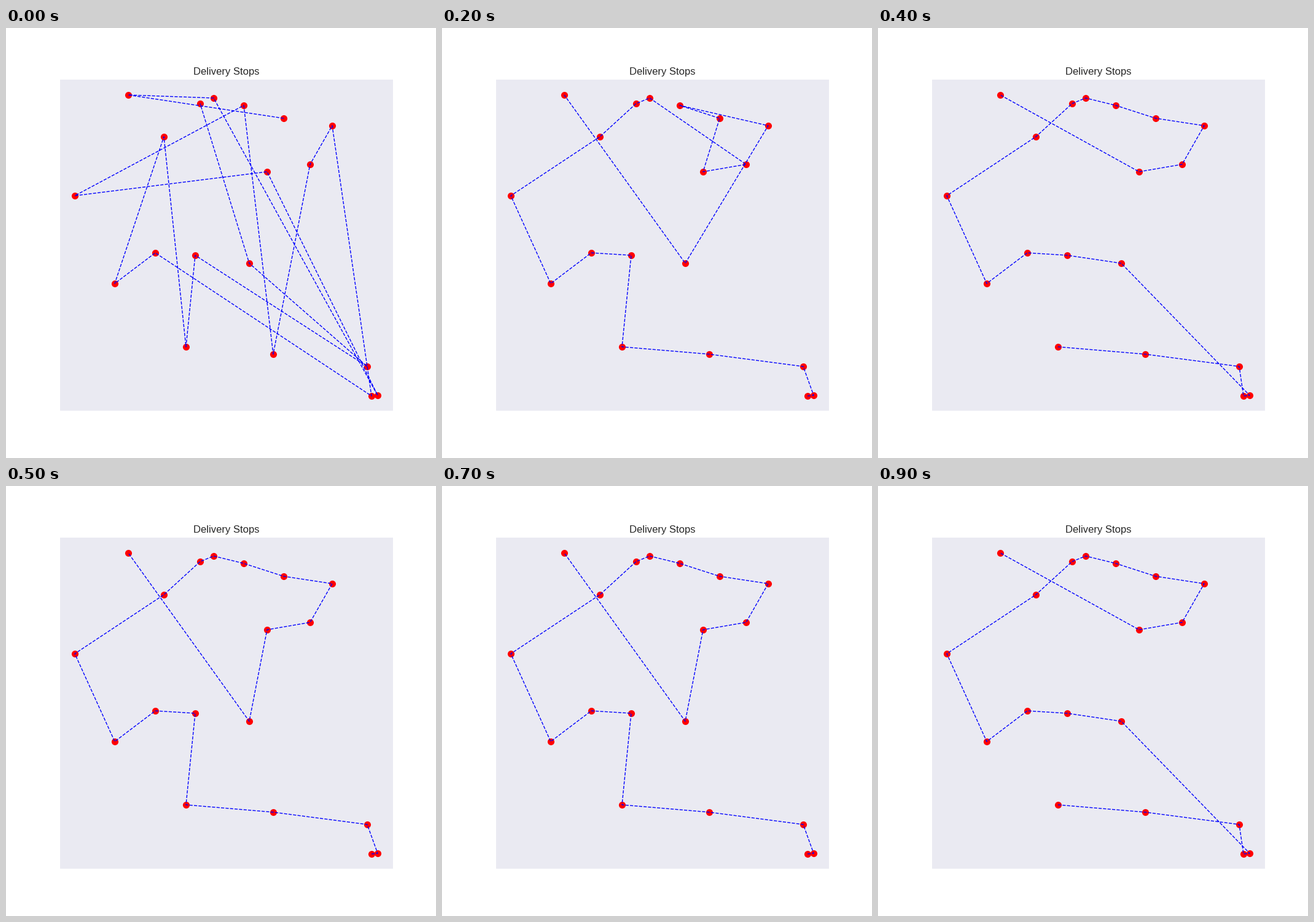
A matplotlib script for the animation above (1000 ms loop, 700 by 700 pixels).

```python
import math

import matplotlib.pyplot as plt
from matplotlib.animation import FuncAnimation

SIZE, DPI = 700, 100
FRAMES, INTERVAL = 10, 100

# Stop positions in stage pixels, y pointing down.
STOPS = {
    "A": (199, 109), "B": (338, 114), "C": (316, 123), "D": (387, 126),
    "E": (452, 147), "F": (531, 159), "G": (257, 177), "H": (495, 222),
    "I": (425, 234), "J": (112, 273), "K": (243, 366), "L": (308, 370),
    "M": (396, 383), "N": (177, 416), "O": (293, 519), "P": (435, 531),
    "Q": (588, 551), "R": (595, 599), "S": (605, 598),
}
Y_SCALE = 1.02  # map distance per pixel, vertical relative to horizontal

# The search explores first, then settles on nearest-neighbour tours.
EXPLORED = ["EABSIJDPHFRKNGOLQMC", "KLMPOHIDBCGAJNEFRQS", "RSQPOLKNJGCBHIEDFMA"]
LATER_STARTS = "SORFRQO"


def distance(a, b):
    (ax_, ay), (bx, by) = STOPS[a], STOPS[b]
    return math.hypot(ax_ - bx, Y_SCALE * (ay - by))


def nearest_tour(start):
    tour, left = [start], set(STOPS) - {start}
    while left:
        tour.append(min(left, key=lambda stop: distance(tour[-1], stop)))
        left.remove(tour[-1])
    return tour


def coords(names):
    return tuple(zip(*(STOPS[name] for name in names)))


TOURS = EXPLORED + [nearest_tour(start) for start in LATER_STARTS]

fig = plt.figure(figsize=(SIZE / DPI, SIZE / DPI), dpi=DPI, facecolor="white")
box = [0.125, 0.11, 0.775, 0.77]
ax = fig.add_axes(box, facecolor="#EAEAF2")
ax.set_xlim(box[0] * SIZE, (box[0] + box[2]) * SIZE)
ax.set_ylim((1 - box[1]) * SIZE, (1 - box[1] - box[3]) * SIZE)
ax.set_xticks([])
ax.set_yticks([])
for spine in ax.spines.values():
    spine.set_visible(False)
ax.set_title("Delivery Stops", fontsize=12, color="0.15", family="Liberation Sans")

ax.plot(*coords(STOPS), "o", color="red", markersize=8, markeredgewidth=0, zorder=2)
route, = ax.plot([], [], "--", color="blue", linewidth=1, zorder=3)


def draw(frame):
    route.set_data(*coords(TOURS[frame]))
    return [route]


anim = FuncAnimation(fig, draw, frames=FRAMES, interval=INTERVAL, repeat=True,
                     repeat_delay=0)
plt.show()
```
